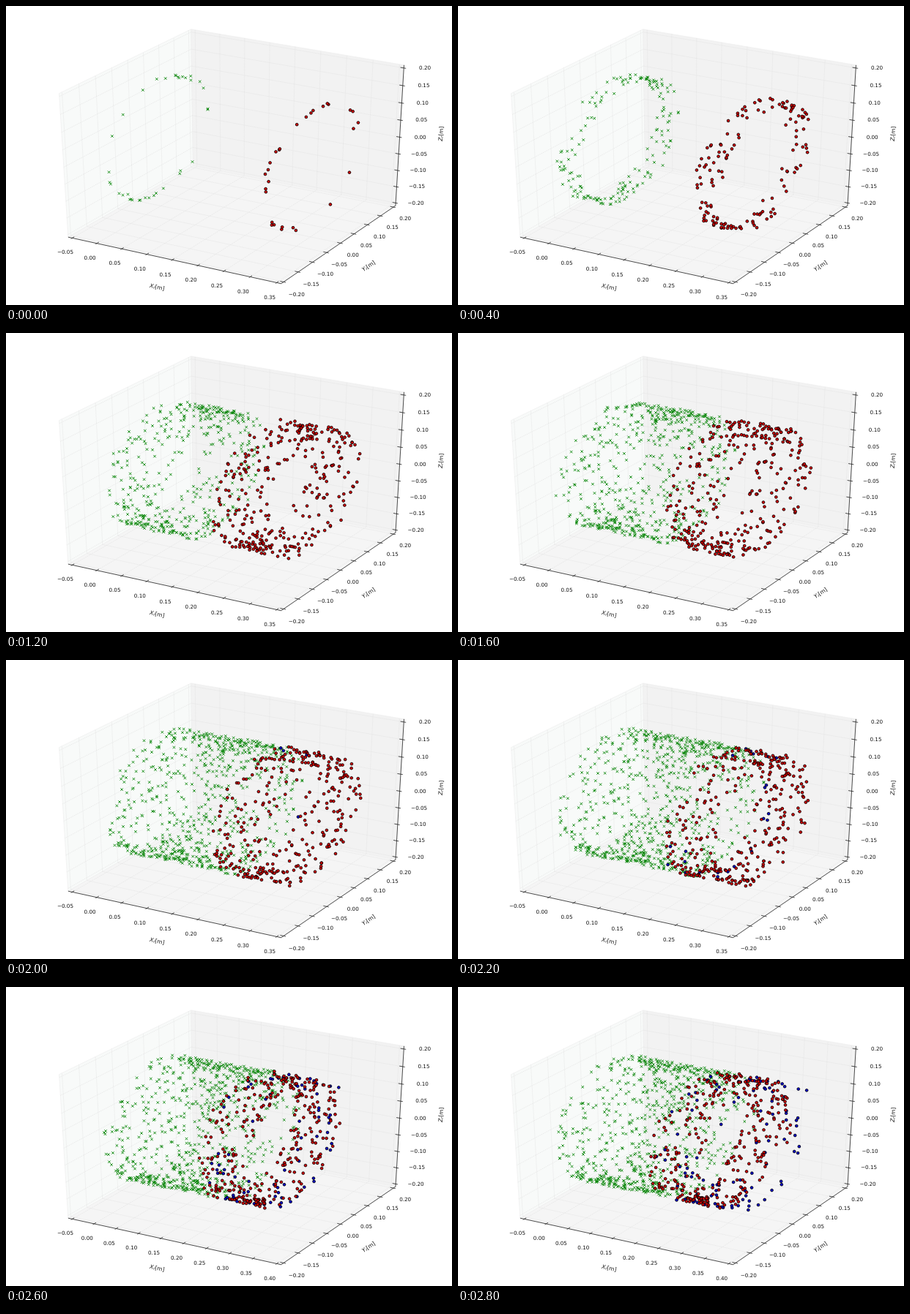
An HTML page with a canvas for the animation above (2900 ms loop, 609 by 409 pixels).

```html
<!DOCTYPE html>
<html>
<head>
<meta charset="utf-8">
<style>
html, body { margin: 0; width: 100%; height: 100%; overflow: hidden; background: #fff; }
canvas { display: block; }
</style>
</head>
<body>
<canvas id="stage" width="609" height="409"></canvas>
<script>
const ctx = document.getElementById('stage').getContext('2d');
const H = 0.5208;          // half size of the padded box
const LABEL = 0.59;        // distance of tick labels from the centre
const STEP = 100, STEPS = 29, SPEED = 0.0095;

// Perspective view of a unit cube centred on the origin: elevation 30, azimuth -60.
function project([x, y, z]) {
  const depth = 10 - (0.433 * x - 0.75 * y + 0.5 * z);
  const right = 0.866 * x + 0.5 * y;
  const up = -0.25 * x + 0.433 * y + 0.866 * z;
  return [312 + 3223 * right / depth, 199.6 - 2154 * up / depth];
}

function trace(points) {
  ctx.beginPath();
  points.forEach(p => ctx.lineTo(...project(p)));
}

function pane(color, points) {
  trace(points);
  ctx.closePath();
  ctx.fillStyle = color;
  ctx.fill();
  ctx.strokeStyle = '#eee';
  ctx.lineWidth = 0.7;
  ctx.stroke();
}

function line(color, width, points) {
  trace(points);
  ctx.strokeStyle = color;
  ctx.lineWidth = width;
  ctx.stroke();
}

function ticks(min, max) {
  const count = Math.round((max - min) / 0.05);
  return Array.from({ length: count + 1 }, (_, i) => ({
    at: i / count - 0.5,
    text: (min + i * 0.05 + 1e-9).toFixed(2).replace('-', '−')
  }));
}

// grid: folded grid line, mark: tick ends, label: text anchor, shift: label offset
const axes = [
  { ends: [[-H, -H, -H], [H, -H, -H]], shift: [2, 0.5],
    grid: v => [[v, -H, -H], [v, H, -H], [v, H, H]],
    mark: v => [[v, -H - 0.01, -H], [v, -H + 0.016, -H]],
    label: v => [v, -LABEL, -LABEL] },
  { ends: [[H, -H, -H], [H, H, -H]], shift: [-2.3, 0.3],
    grid: v => [[H, v, -H], [-H, v, -H], [-H, v, H]],
    mark: v => [[H + 0.01, v, -H], [H - 0.016, v, -H]],
    label: v => [LABEL, v, -LABEL] },
  { ends: [[H, H, -H], [H, H, H]], shift: [-1.3, 3],
    grid: v => [[-H, -H, v], [-H, H, v], [H, H, v]],
    mark: v => [[H + 0.01, H, v], [H - 0.016, H, v]],
    label: v => [LABEL, LABEL, v] }
];

function axisTitle(letter, x, y, degrees) {
  const parts = [[letter, 'italic 7.5px', 0], ['r', 'italic 5.2px', 1.3], ['[m]', '7.5px', 0]];
  ctx.save();
  ctx.translate(x, y);
  ctx.rotate(degrees * Math.PI / 180);
  ctx.textAlign = 'left';
  let left = -10;
  for (const [text, style, drop] of parts) {
    ctx.font = style + ' "DejaVu Sans", sans-serif';
    ctx.fillText(text, left, drop);
    left += ctx.measureText(text).width;
  }
  ctx.restore();
}

function drawAxes(xMax) {
  pane('#f8faf9', [[-H, -H, -H], [-H, H, -H], [-H, H, H], [-H, -H, H]]);
  pane('#f2f2f2', [[-H, H, -H], [H, H, -H], [H, H, H], [-H, H, H]]);
  pane('#f5f5f5', [[-H, -H, -H], [H, -H, -H], [H, H, -H], [-H, H, -H]]);
  const scales = [ticks(-0.05, xMax), ticks(-0.2, 0.2), ticks(-0.2, 0.2)];
  ctx.setLineDash([1, 1]);
  axes.forEach((axis, i) => scales[i].forEach(t => line('#dedede', 0.7, axis.grid(t.at))));
  ctx.setLineDash([]);
  ctx.textBaseline = 'middle';
  axes.forEach((axis, i) => {
    line('#222', 0.8, axis.ends);
    ctx.fillStyle = '#111';
    ctx.font = '7.2px "DejaVu Sans", sans-serif';
    ctx.textAlign = 'center';
    for (const t of scales[i]) {
      line('#222', 0.8, axis.mark(t.at));
      const [x, y] = project(axis.label(t.at));
      ctx.fillText(t.text, x + axis.shift[0], y + axis.shift[1]);
    }
  });
  axisTitle('X', 206, 385, 12.4);
  axisTitle('Y', 495.5, 356, -34);
  axisTitle('Z', 594.5, 175, -86);
}

function seeded(seed) {
  return () => {
    seed = (seed + 0x6D2B79F5) | 0;
    let n = Math.imul(seed ^ seed >>> 15, seed | 1);
    n ^= n + Math.imul(n ^ n >>> 7, n | 61);
    return ((n ^ n >>> 14) >>> 0) / 4294967296;
  };
}

// One noisy ring of the pipe is measured at every step.
function rings(seed, size) {
  const random = seeded(seed);
  return Array.from({ length: STEPS }, () => Array.from({ length: size }, () => ({
    angle: random() * 2 * Math.PI,
    radius: 0.163 + (random() - 0.5) * 0.012,
    jitter: (random() - 0.5) * 0.01,
    chance: random()
  })));
}
const rear = rings(7, 36), front = rings(21, 29);

function cross(x, y) {
  const r = 1.7;
  ctx.beginPath();
  ctx.moveTo(x - r, y - r);
  ctx.lineTo(x + r, y + r);
  ctx.moveTo(x + r, y - r);
  ctx.lineTo(x - r, y + r);
  ctx.strokeStyle = '#0a860a';
  ctx.lineWidth = 0.95;
  ctx.stroke();
}

function dot(x, y, color) {
  ctx.beginPath();
  ctx.arc(x, y, 1.9, 0, 2 * Math.PI);
  ctx.fillStyle = color;
  ctx.fill();
  ctx.strokeStyle = '#000';
  ctx.lineWidth = 0.8;
  ctx.stroke();
}

function drawPoints(step, xMax) {
  const place = (p, x) => project([
    (x + 0.05) / (xMax + 0.05) - 0.5,
    p.radius * Math.cos(p.angle) / 0.4,
    p.radius * Math.sin(p.angle) / 0.4
  ]);
  const dots = [];
  for (let born = 0; born <= step; born++) {
    const age = step - born;
    for (const p of rear[born]) {
      const x = age * SPEED + p.jitter;
      const limit = 0.183 + p.chance * 0.05;
      if (x < limit) cross(...place(p, x));
      else if (p.chance < 0.42) dots.push([...place(p, x + (x - 0.183) * 0.8 + 0.012), '#0000c8']);
    }
    if (age > 10) continue;
    for (const p of front[born]) dots.push([...place(p, 0.3 - age * SPEED + p.jitter), '#d00000']);
  }
  dots.forEach(d => dot(...d));
}

function frame() {
  const step = Math.floor(performance.now() / STEP) % STEPS;
  const xMax = step < 26 ? 0.35 : 0.4;
  ctx.fillStyle = '#fff';
  ctx.fillRect(0, 0, 609, 409);
  drawAxes(xMax);
  drawPoints(step, xMax);
  requestAnimationFrame(frame);
}
frame();
</script>
</body>
</html>
```
